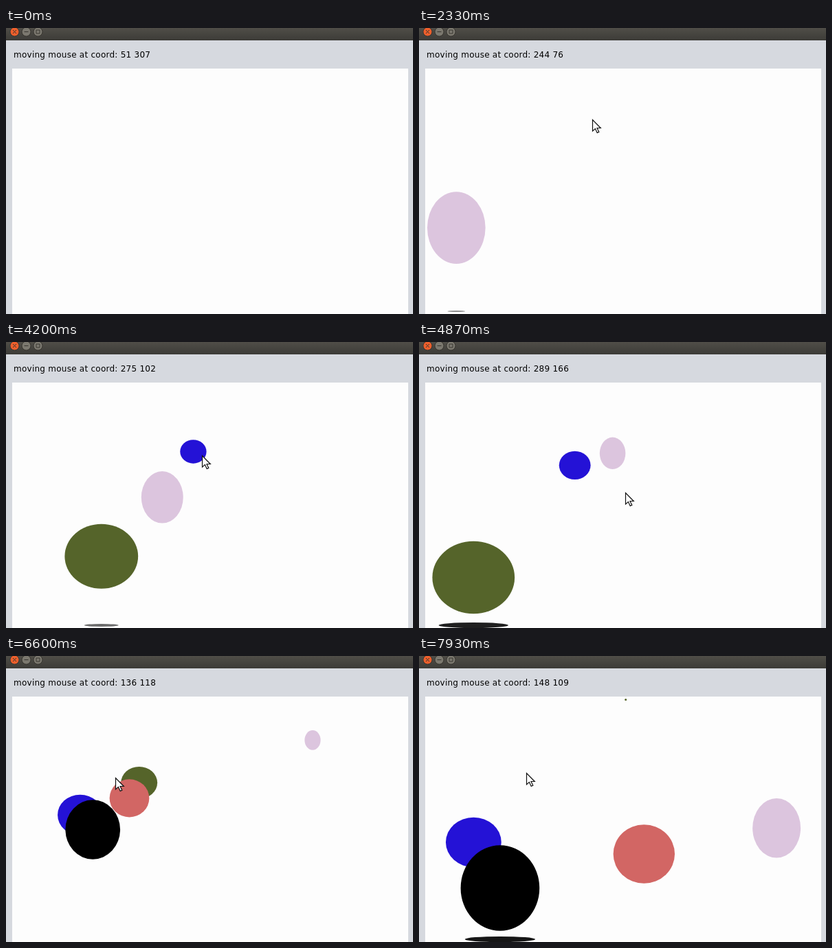
An HTML page that plays this animation: 592 by 416 pixels, repeating every 8 s.

```html
<!DOCTYPE html>
<html lang="en">
<head>
<meta charset="utf-8">
<title>Bouncing balls</title>
<style>
  html, body { margin: 0; width: 100%; height: 100%; overflow: hidden; background: #d6d9df; }
  svg { display: block; width: 592px; height: 416px; }
  text { font: 12px "DejaVu Sans", sans-serif; letter-spacing: .25px; white-space: pre; }
</style>
</head>
<body>
<svg viewBox="0 0 592 416">
  <defs>
    <linearGradient id="bar" x2="0" y2="1">
      <stop offset="0" stop-color="#504e48"/>
      <stop offset="1" stop-color="#3c3b37"/>
    </linearGradient>
    <clipPath id="room"><rect x="9" y="59" width="576" height="357"/></clipPath>
  </defs>
  <rect width="592" height="416" fill="#d6d9df"/>
  <rect width="592" height="18" fill="url(#bar)"/>
  <g fill="#7b786f" stroke="#383630">
    <circle cx="12.5" cy="5.5" r="6.5" fill="#ee5f2c"/>
    <circle cx="29.5" cy="5.5" r="6.5"/>
    <circle cx="46.5" cy="5.5" r="6.5"/>
    <path d="M10 3l5 5m0-5l-5 5M26.5 5.5h6M44 3h5v5h-5z" fill="none"/>
  </g>
  <text id="label" x="11" y="43"></text>
  <rect x="9" y="59" width="576" height="357" fill="#fdfdfd"/>
  <g id="scene" clip-path="url(#room)"></g>
  <path id="cursor" d="M.5-.5v16.5l3.9-3.6 2.8 6 2.6-1.2-2.8-5.7h5.3z"
        fill="#fff" stroke="#111" stroke-width="1.2"/>
</svg>
<script>
const LOOP = 8000, TICKS = 120, SPEED = 1.65;
const LEFT = 7.5, RIGHT = 584, TOP = 59, BOTTOM = 413;
const ENTER = 2, BLANK = 108;
const scene = document.getElementById('scene');
const label = document.getElementById('label');
const cursor = document.getElementById('cursor');

// Pointer stops: tick, x, y
const path = [
  [ENTER, 59, 365], [14, 102, 164], [20, 102, 164], [32, 252, 134],
  [35, 252, 134], [37, 257, 136], [52, 271, 134], [58, 278, 134],
  [72, 297, 224], [73, 300, 220], [78, 225, 140], [87, 339, 217],
  [88, 344, 214], [98, 144, 176], [BLANK, 292, 199], [118, 156, 167], [119, 156, 171]
];

// Each click drops a ball at the pointer; w and h are its growth per pixel of fall.
const balls = [
  { born: 20, vx: -4, vy: 3, w: .472, h: .584, fill: '#dcc5de' },
  { born: 37, vx: -4, vy: 3, w: .519, h: .457, fill: '#55642a' },
  { born: 58, vx: -3, vy: 1, w: .46, h: .413, fill: '#2412d6' },
  { born: 78, vx: -4, vy: 2, w: .53, h: .575, fill: '#000' },
  { born: 98, vx: 4, vy: 2, w: .48, h: .458, fill: '#d26664' }
];

function set(node, attrs) {
  for (const key in attrs) node.setAttribute(key, attrs[key]);
}

function show(node, on) {
  node.style.display = on ? '' : 'none';
}

function addEllipse(fill) {
  const node = document.createElementNS('http://www.w3.org/2000/svg', 'ellipse');
  node.setAttribute('fill', fill);
  return scene.appendChild(node);
}

for (const ball of balls) ball.shadow = addEllipse('#000');
for (const ball of balls) ball.body = addEllipse(ball.fill);

function pointerAt(tick) {
  const t = Math.max(ENTER, tick);
  const i = Math.max(1, path.findIndex(stop => stop[0] >= t));
  const [t0, x0, y0] = path[i - 1], [t1, x1, y1] = path[i];
  const k = (t - t0) / (t1 - t0);
  return [Math.round(x0 + (x1 - x0) * k), Math.round(y0 + (y1 - y0) * k)];
}

// Top left corner of a ball after it has bounced around the room.
function travel({ born, vx, vy, w, h }, tick) {
  let [x, y] = pointerAt(born);
  const floor = (BOTTOM + TOP * h) / (1 + h);
  for (let t = born; t < tick; t++) {
    x += vx * SPEED;
    y += vy * SPEED;
    const wall = RIGHT - w * (y - TOP);
    if (x < LEFT || x > wall) {
      x = 2 * (x < LEFT ? LEFT : wall) - x;
      vx = -vx;
    }
    if (y < TOP || y > floor) {
      y = 2 * (y < TOP ? TOP : floor) - y;
      vy = -vy;
    }
  }
  return [x, y];
}

function drawBall(ball, tick) {
  const alive = tick >= ball.born;
  const [x, y] = travel(ball, tick);
  const rx = Math.max(1.5, ball.w * (y - TOP) / 2);
  const ry = Math.max(1.5, ball.h * (y - TOP) / 2);
  const cx = x + rx;
  set(ball.body, { cx, cy: y + ry, rx, ry });
  show(ball.body, alive);

  // The shadow widens and darkens as the ball nears the floor.
  const near = Math.min(1, 1 - (410 - y - 2 * ry) / 96);
  const visible = alive && near > .22;
  show(ball.shadow, visible);
  if (!visible) return;
  const grey = Math.round((1 - near) * 200);
  set(ball.shadow, {
    cx, cy: 412, rx: rx * near, ry: Math.max(.8, rx * near * .08),
    fill: `rgb(${grey},${grey},${grey})`
  });
}

function draw(ms) {
  const tick = Math.min(TICKS - 1, Math.floor((ms % LOOP + 5) * TICKS / LOOP));
  const [px, py] = pointerAt(tick);
  const [lx, ly] = pointerAt(tick - 1); // the readout lags by one tick
  show(cursor, tick >= ENTER);
  cursor.setAttribute('transform', `translate(${px} ${py})`);
  label.textContent = tick === BLANK ? '' : `moving mouse at coord: ${lx - 8} ${ly - 58}`;
  for (const ball of balls) drawBall(ball, tick);
}

const start = performance.now();
function loop() {
  draw(performance.now() - start);
  requestAnimationFrame(loop);
}
loop();
</script>
</body>
</html>
```
